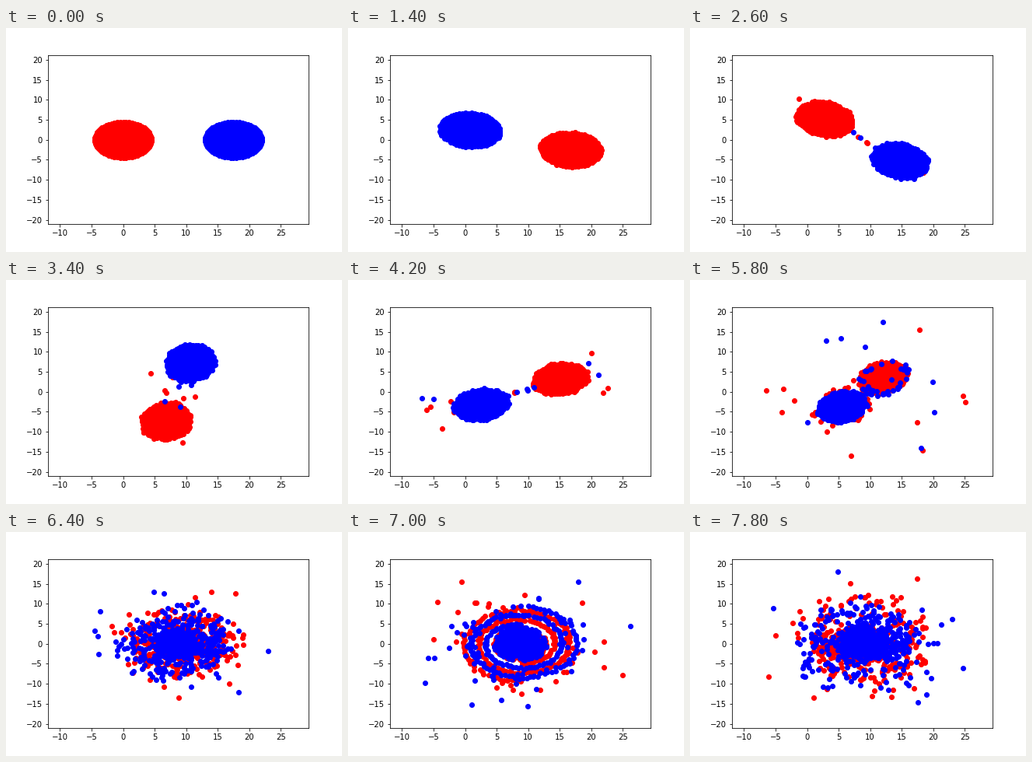
A matplotlib script that plays this animation: 432 by 288 pixels, repeating every 8000 ms.

```python
import numpy as np
import matplotlib.pyplot as plt
from matplotlib.animation import FuncAnimation

FRAMES, STEP_MS = 40, 200
CENTER = np.array([8.75, 0.0])
RINGS, PER_RING, DISC_R = 14, 60, 4.5
MERGE_T, GM = 30.3, 430.0
TAU = 2 * np.pi

# Waves of stray stars: time, count, angular spread, farthest distance
WAVES = [(13, 7, 0.12, 15), (21, 11, 0.2, 16), (29, 15, 0.9, 18.5)]


def smooth(x):
    x = np.clip(x, 0, 1)
    return x * x * (3 - 2 * x)


def polar(r, a):
    return np.stack([r * np.cos(a), r * np.sin(a)], axis=-1)


def kepler(mass, r):
    return np.sqrt(mass / r ** 3)


def orbit(t):
    """Inspiral of the two cores: half separation and angle."""
    left = max(0.0, 1 - t / MERGE_T)
    return 8.75 * left ** 0.18, np.radians(1117 * (1 - left ** 0.6))


class Galaxy:
    def __init__(self, side, seed):
        self.side = side
        self.rng = np.random.default_rng(seed)
        n = RINGS * PER_RING
        ring = np.repeat(np.arange(RINGS), PER_RING)
        self.make_disc(n, ring)
        picks = self.rng.permutation(n)
        loose, swap = picks[:65], picks[65:115]

        # Stars that move over to the other core
        self.hop_t = np.full(n, np.inf)
        self.hop_t[swap] = self.rng.uniform(21, 29, len(swap))
        self.make_merged(n, ring, loose)
        self.make_strays(loose)

    def make_disc(self, n, ring):
        self.r0 = np.linspace(0.3, DISC_R, RINGS)[ring]
        self.a0 = np.tile(np.arange(PER_RING) * TAU / PER_RING, RINGS)
        self.spin = kepler(GM, self.r0)
        self.wobble = np.clip(self.rng.normal(size=n), -2, 2)
        self.hop_r = self.rng.uniform(3.8, 5.5, n)

    def make_merged(self, n, ring, loose):
        """A dense core, a spiral of two turns and a loose halo."""
        rng = self.rng
        arm = ring >= RINGS - 3
        u = (ring + rng.random(n)) / (RINGS - 3)
        r = np.interp(u, [0, 0.6, 1], [0.2, 2.5, 4.2])
        a = rng.uniform(0, TAU, n)
        s = np.linspace(0, 1, arm.sum())
        r[arm] = 4.9 + 4.6 * s + rng.normal(0, 0.15, arm.sum())
        a[arm] = 2 * TAU * s + self.side * np.pi / 2
        r[loose] = 7 + rng.exponential(3.2, len(loose))
        self.end_r, self.end_a = np.minimum(r, 18), a
        self.end_spin = kepler(2 * GM, self.end_r)
        self.ecc = rng.uniform(0.1, 0.45, n)
        self.ecc[loose] *= 0.3
        self.beat = rng.uniform(0.5, 1.4, n) * rng.choice([-1, 1], n)

    def make_strays(self, loose):
        """Loose stars leave through either end of the axis and return."""
        rng = self.rng
        t, r, a, width = [], [], [], []
        for when, count, spread, reach in WAVES:
            far = rng.random(count) < 0.65
            r.append(np.where(far, rng.uniform(11, reach, count),
                              rng.uniform(0.5, 3, count)))
            end = rng.choice([0, np.pi], count)
            a.append(orbit(when)[1] + end + rng.normal(-0.1, spread, count))
            t.append(np.full(count, when))
            width.append(np.full(count, min(8, when / 2)))
        self.out_t, self.out_r, self.out_a, self.out_w = map(
            np.concatenate, (t, r, a, width))
        self.out_spin = np.minimum(kepler(2 * GM, self.out_r), 0.6)
        self.loose = loose[:len(self.out_t)]

    def disc(self, t):
        half, a = orbit(t)
        hop = smooth((t - self.hop_t) / 4)
        r = self.r0 + (self.hop_r - self.r0) * hop
        r = r * (1 + 0.035 * self.wobble * min(t / 13, 1.5))
        r = r * np.interp(t, [7, 29], [1, 0.82])
        k = 1 + 0.1 * min(t / 10, 1)
        p = polar(r, self.a0 + self.spin * t - a) * [k, 1 / k]
        p[:, 0] += self.side * half * (1 - 2 * hop)
        c, s = np.cos(a), np.sin(a)
        return p @ np.array([[c, s], [-s, c]])

    def merged(self, t):
        dt = t - 35
        r = self.end_r * (1 + self.ecc * np.sin(self.beat * dt))
        return polar(np.minimum(r, 18.5), self.end_a + self.end_spin * dt)

    def at(self, t):
        p = self.disc(t)
        dt = t - self.out_t
        w = np.cos(np.clip(dt / self.out_w, -1, 1) * np.pi / 2) ** 2
        out = polar(self.out_r, self.out_a + self.out_spin * dt)
        p[self.loose] += (out - p[self.loose]) * w[:, None]
        p += (self.merged(t) - p) * smooth((t - 29) / 4)
        return p + CENTER


galaxies = [Galaxy(-1, 4), Galaxy(1, 9)]

fig, ax = plt.subplots(figsize=(6, 4), dpi=72)
fig.subplots_adjust(left=0.125, right=0.9, bottom=0.125, top=0.88)
ax.set_xlim(-11.905, 29.377)
ax.set_ylim(-21.04, 21.22)
ax.set_xticks(range(-10, 30, 5))
ax.set_yticks(range(-20, 25, 5))
dots = [ax.plot([], [], fmt)[0] for fmt in ("ro", "bo")]


def update(i):
    for line, galaxy in zip(dots, galaxies):
        line.set_data(*galaxy.at(i).T)
    return dots


anim = FuncAnimation(fig, update, frames=FRAMES, interval=STEP_MS,
                     repeat=True, repeat_delay=0)
plt.show()
```
